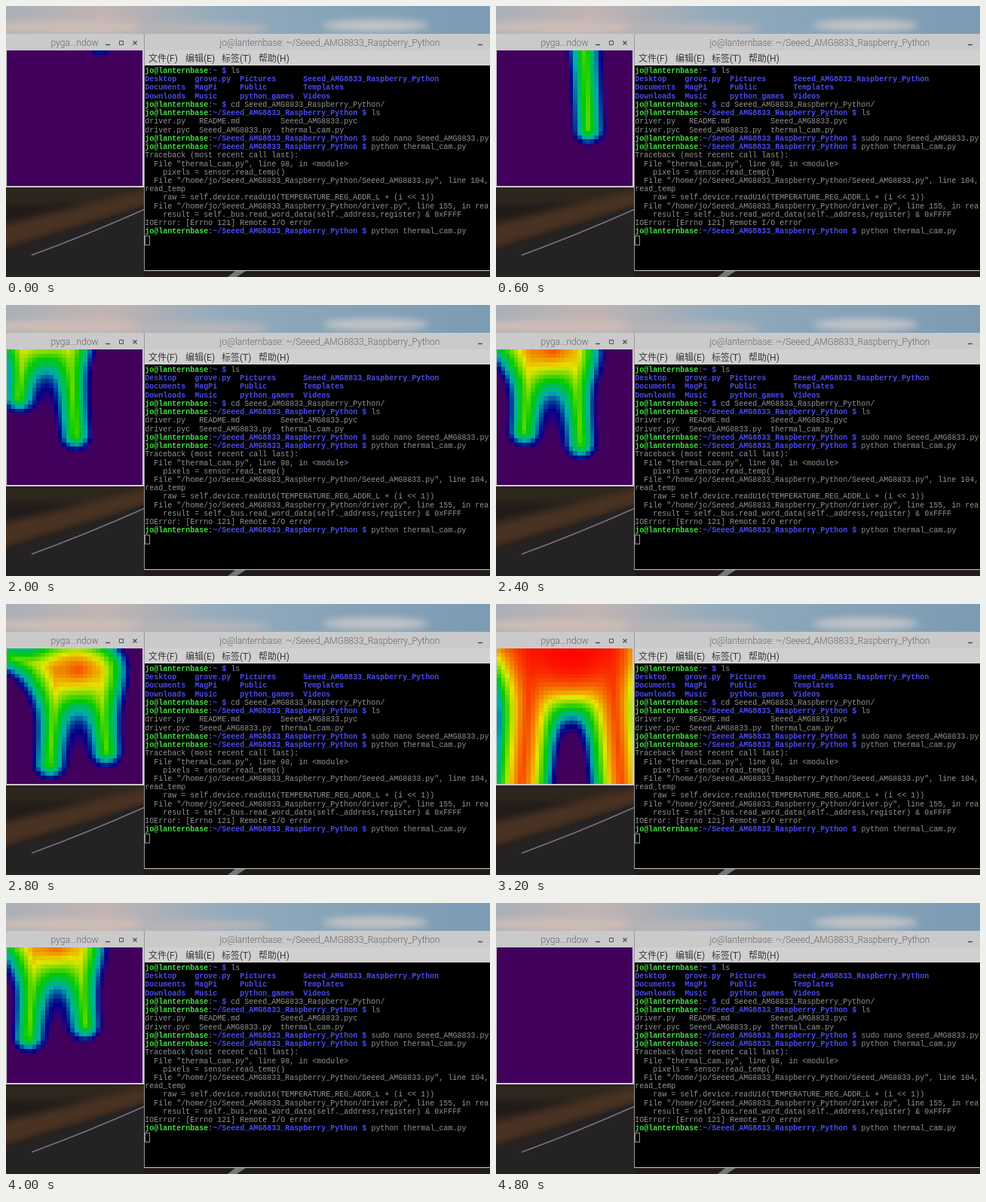
Write an HTML page with a canvas that moves like this. It is 642 px wide and 360 px high and loops after 5 s.

```html
<!DOCTYPE html>
<html lang="en">
<head>
<meta charset="utf-8">
<title>Thermal camera desktop</title>
<style>
html, body { margin: 0; width: 100%; height: 100%; overflow: hidden; background: #1c1918; }
#stage { position: relative; width: 642px; height: 360px; overflow: hidden; }
svg { position: absolute; left: 0; top: 0; display: block; }
canvas { position: absolute; left: 1px; top: 59px; width: 180px; height: 180px; image-rendering: pixelated; }
.bar { font: 300 12px Roboto, "Noto Sans", sans-serif; fill: #66666a; }
.menu { font: 400 12px Roboto, "Noto Sans CJK SC", "Noto Sans CJK", sans-serif; fill: #3a3a3a; }
.term text { font: 10px "Liberation Mono", "DejaVu Sans Mono", monospace; fill: #929292; white-space: pre; }
.term .host { fill: #48dc48; font-weight: 700; }
.term .dir { fill: #4a4aea; font-weight: 700; }
.icon { fill: none; stroke: #505052; }
.frame { fill: #cacacb; }
</style>
</head>
<body>
<div id="stage">
<svg width="642" height="360" viewBox="0 0 642 360">
  <defs>
    <linearGradient id="sky">
      <stop offset="0" stop-color="#a9b0b8"/>
      <stop offset=".2" stop-color="#c2b4b2"/>
      <stop offset=".45" stop-color="#93abbc"/>
      <stop offset=".7" stop-color="#86a3b8"/>
      <stop offset="1" stop-color="#7c9cb4"/>
    </linearGradient>
    <filter id="soft" x="-30%" y="-60%" width="160%" height="220%"><feGaussianBlur stdDeviation="5"/></filter>
  </defs>

  <rect width="642" height="40" fill="url(#sky)"/>
  <g filter="url(#soft)">
    <ellipse cx="80" cy="28" rx="110" ry="8" fill="#cdbdb6"/>
    <ellipse cx="260" cy="30" rx="90" ry="7" fill="#b9b6b8"/>
    <ellipse cx="490" cy="26" rx="70" ry="8" fill="#c3c4c6"/>
  </g>

  <rect y="238" width="642" height="122" fill="#211c1a"/>
  <g filter="url(#soft)">
    <rect x="-10" y="238" width="200" height="24" fill="#2e261a"/>
    <path d="M-10 292L190 244V264L-10 324Z" fill="#4a3120"/>
  </g>
  <path d="M0 326L184 266V360H0Z" fill="#252224"/>
  <path d="M34 331Q110 303 184 270" fill="none" stroke="#77767e" stroke-width="1.4"/>
  <path d="M294 360L304 352H318L306 360Z" fill="#77767a"/>

  <g id="pygame">
    <path class="frame" d="M0 241V39q0-2 2-2H180q3 0 3 3V241Z"/>
    <text class="bar" x="91" y="53" text-anchor="middle">pyga...ndow</text>
    <path class="icon" d="M132 51.500h6" stroke-width="1.500"/>
    <path class="icon" d="M150.500 46.500h5v5h-5z"/>
    <path class="icon" d="M168.500 46.500l5 5m0-5l-5 5" stroke-width="1.300"/>
  </g>

  <g id="terminal">
    <path class="frame" d="M183 352V40q0-3 3-3H642V352Z"/>
    <rect x="184" y="59" width="458" height="20" fill="#d0d0d0"/>
    <rect x="184" y="79" width="458" height="272"/>
    <path d="M183.500 38V352" stroke="#98989a"/>
    <text class="bar" x="429.500" y="53" text-anchor="middle">jo@lanternbase: ~/Seeed_AMG8833_Raspberry_Python</text>
    <path class="icon" d="M626 51.500h6" stroke-width="1.500"/>
    <g class="menu">
      <text x="189" y="74">文件(F)</text>
      <text x="238" y="74">编辑(E)</text>
      <text x="286" y="74">标签(T)</text>
      <text x="335" y="74">帮助(H)</text>
    </g>
    <g class="term" id="lines"></g>
    <rect x="184.500" y="305.500" width="6" height="12" fill="none" stroke="#929292"/>
  </g>
</svg>
<canvas id="heat" width="32" height="32"></canvas>
</div>
<script>
const REPO = "Seeed_AMG8833_Raspberry_Python";
const prompt = (dir, cmd) => [["jo@lanternbase", "host"], [":"], [dir + " $ ", "dir"], [cmd]];
const dirs = s => [[s, "dir"]];
const out = s => [[s]];

const lines = [
  prompt("~", "ls"),
  dirs("Desktop    grove.py  Pictures      " + REPO),
  dirs("Documents  MagPi     Public        Templates"),
  dirs("Downloads  Music     python_games  Videos"),
  prompt("~", `cd ${REPO}/`),
  prompt("~/" + REPO, "ls"),
  out("driver.py   README.md         Seeed_AMG8833.pyc"),
  out("driver.pyc  Seeed_AMG8833.py  thermal_cam.py"),
  prompt("~/" + REPO, "sudo nano Seeed_AMG8833.py"),
  prompt("~/" + REPO, "python thermal_cam.py"),
  out("Traceback (most recent call last):"),
  out('  File "thermal_cam.py", line 98, in <module>'),
  out("    pixels = sensor.read_temp()"),
  out(`  File "/home/jo/${REPO}/Seeed_AMG8833.py", line 104,`),
  out("read_temp"),
  out("    raw = self.device.readU16(TEMPERATURE_REG_ADDR_L + (i << 1))"),
  out(`  File "/home/jo/${REPO}/driver.py", line 155, in rea`),
  out("    result = self._bus.read_word_data(self._address,register) & 0xFFFF"),
  out("IOError: [Errno 121] Remote I/O error"),
  prompt("~/" + REPO, "python thermal_cam.py")
];

const SVG = "http://www.w3.org/2000/svg";
const add = (parent, name, attrs) => {
  const el = parent.appendChild(document.createElementNS(SVG, name));
  for (const k in attrs) el.setAttribute(k, attrs[k]);
  return el;
};
lines.forEach((parts, i) => {
  const row = add(document.getElementById("lines"), "text", { x: 184.3, y: 89 + i * 11.23 });
  for (const [s, cls] of parts) add(row, "tspan", cls ? { class: cls } : {}).textContent = s;
});

// One hand over the sensor: palm position in cells, turn (right finger ahead of left) and size.
const path = [
  { t: 0,    x: 15.3, y: -36,   turn: 12.5, size: 1 },
  { t: 800,  x: 14.8, y: -10,   turn: 15,   size: 1 },
  { t: 1200, x: 14.4, y: -13.5, turn: 13,   size: 1 },
  { t: 2000, x: 9.5,  y: -5,    turn: 4.5,  size: 1 },
  { t: 2800, x: 16.8, y: 5,     turn: -1.5, size: 1 },
  { t: 3600, x: 18.3, y: -6,    turn: 0,    size: 2.6 },
  { t: 4000, x: 11.8, y: -1,    turn: -1.4, size: 1 },
  { t: 4600, x: 11.8, y: -3,    turn: -1.4, size: 1 },
  { t: 4800, x: 12.6, y: -37,   turn: 12.5, size: 1 }
];
const LOOP = 5000, TICK = 200, N = 32, BLEND = 3;

function pose(t) {
  const i = path.findLastIndex(p => p.t <= t);
  const a = path[i], b = path[i + 1] || a;
  const k = a === b ? 0 : (t - a.t) / (b.t - a.t);
  const mix = key => a[key] + (b[key] - a[key]) * k;
  return { x: mix("x"), y: mix("y"), turn: mix("turn"), size: mix("size") };
}

function segment(x, y, x0, y0, x1, y1) {
  const dx = x1 - x0, dy = y1 - y0;
  const k = Math.min(1, Math.max(0, ((x - x0) * dx + (y - y0) * dy) / (dx * dx + dy * dy)));
  return Math.hypot(x - x0 - k * dx, y - y0 - k * dy);
}

// Depth inside palm, thumb and two fingers, melted together, gives the heat.
function warmth(px, py, hand) {
  const s = hand.size, x = (px - hand.x) / s, y = (py - hand.y) / s;
  const finger = side => 4.4 - segment(x, y, side * 5, 0, side * 6.7, 20.6 + side * hand.turn / s);
  const depths = [
    9 - Math.hypot(x * .8, y),
    4 - segment(x, y, -5, 0, -16, -3),
    finger(-1),
    finger(1)
  ];
  const depth = BLEND * Math.log(depths.reduce((sum, d) => sum + Math.exp(d * s / BLEND), 0));
  return Math.max(0, Math.tanh(depth * s ** .3 / 5.5));
}

// Hue runs from violet (cold) to red (hot).
function rgb(v) {
  const h = 282 * (1 - v), l = .18 + .32 * v ** .7;
  return [0, 8, 4].map(n => {
    const k = (n + h / 30) % 12;
    return 255 * (l - l * Math.max(-1, Math.min(k - 3, 9 - k, 1)));
  });
}

const ctx = document.getElementById("heat").getContext("2d");
const img = ctx.createImageData(N, N);

function draw(t) {
  const hand = pose(t);
  for (let i = 0; i < N * N; i++) {
    const v = warmth(i % N + .5, Math.floor(i / N) + .5, hand);
    img.data.set([...rgb(v), 255], i * 4);
  }
  ctx.putImageData(img, 0, 0);
}

const start = performance.now();
let shown = -1;
function frame(now) {
  const t = Math.floor(Math.max(0, now - start) % LOOP / TICK) * TICK;
  if (t !== shown) draw(shown = t);
  requestAnimationFrame(frame);
}
frame(start);
</script>
</body>
</html>
```
